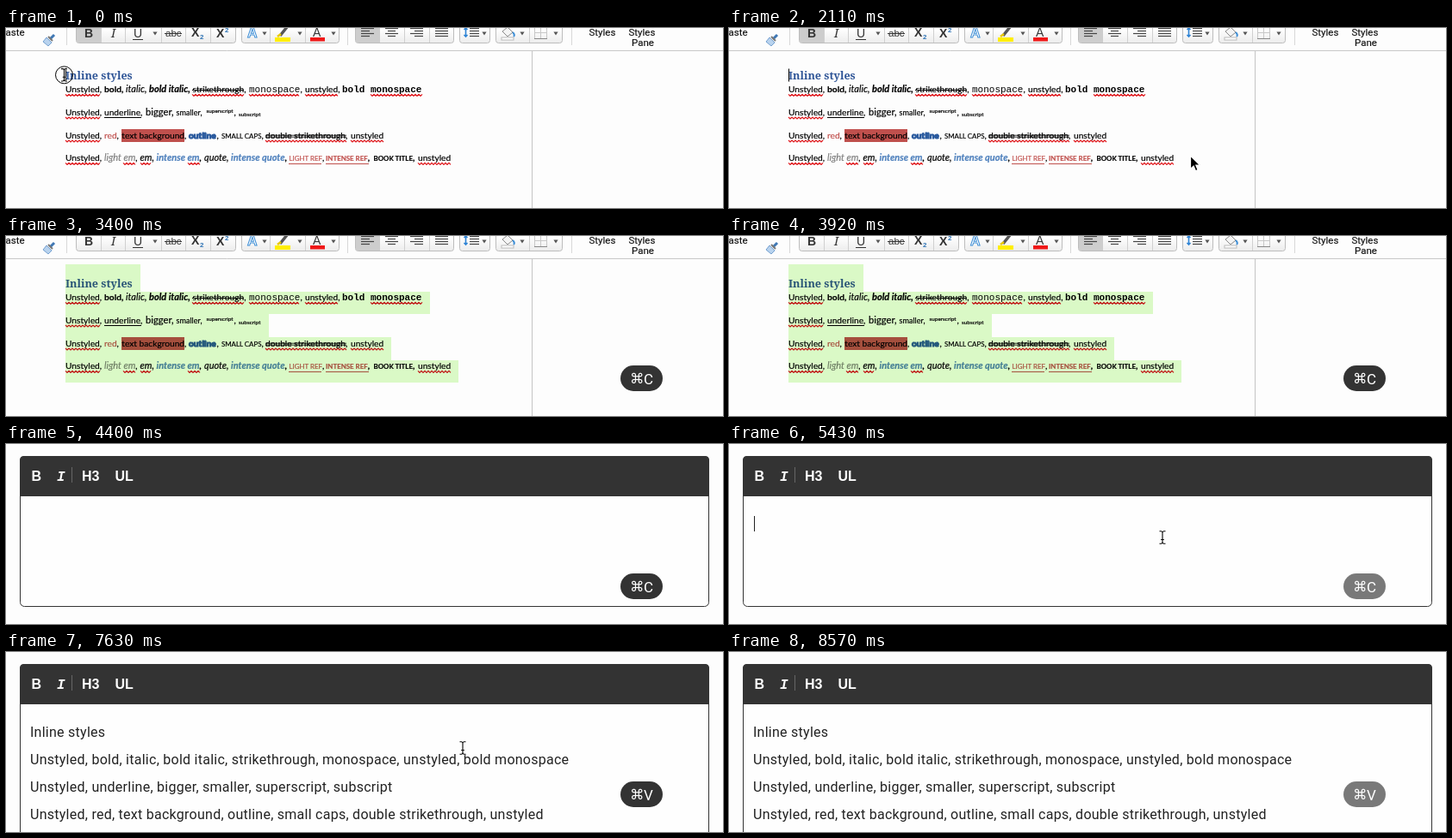
Recreate the animation shown at these times as an HTML page. Size 832 by 210 pixels, loop 8.67 s.

```html
<!DOCTYPE html>
<html lang="en">
<head>
<meta charset="utf-8">
<title>Copy and paste rich text</title>
<style>
  html, body { margin: 0; width: 100%; height: 100%; overflow: hidden; background: #fdfdfd; }
  svg { display: block; width: 832px; height: 210px; }
  text { white-space: pre; }
  .doc { font-family: Lato, Carlito, sans-serif; font-size: 10.2px; fill: currentColor; stroke: currentColor; stroke-width: .2; }
  .ui { font-family: Roboto, sans-serif; font-size: 11.5px; fill: #111; stroke: #111; stroke-width: .15; }
  .btn { font-family: "Liberation Sans", Arial, sans-serif; font-size: 14px; fill: #333; }
  .serif { font-family: "Noto Serif", serif; }
  .b { font-weight: 700; }
  .i { font-style: italic; }
  .doc.i { font-size: 11px; }
  .doc.caps { font-size: 7.9px; }
  .doc.mono { font-family: "Liberation Mono", monospace; font-size: 11px; stroke-width: 0; }
  .doc.outline { fill: #4f81bd; stroke: #2a5a9e; stroke-width: 1.2; }
  .body { font-family: Roboto, sans-serif; font-size: 16px; letter-spacing: .26px; fill: #222; }
  .tool { font-family: "Liberation Sans", Arial, sans-serif; font-size: 16px; font-weight: 700; fill: #fff; }
  .tool.i { font-family: "Liberation Mono", monospace; }
  .key { font-family: Roboto, sans-serif; font-size: 17px; fill: #fff; }
  .cmd { font-family: "DejaVu Sans", sans-serif; font-size: 16.5px; fill: #fff; }
  #selection { mix-blend-mode: multiply; }
</style>
</head>
<body>
<svg id="stage" viewBox="0 0 832 210" xmlns="http://www.w3.org/2000/svg"></svg>
<script>
const LOOP = 8670;
const RED = '#c0504d', BLUE = '#4f81bd', NAVY = '#2f5597';

const text = (x, y, str, cls = '', attrs = '') =>
  `<text x="${x}" y="${y}" class="${cls}" ${attrs}>${str}</text>`;
const rect = (x, y, w, h, fill, attrs = '') =>
  `<rect x="${x}" y="${y}" width="${w}" height="${h}" fill="${fill}" ${attrs}/>`;
const path = (d, stroke, width = 1, fill = 'none') =>
  `<path d="${d}" fill="${fill}" stroke="${stroke}" stroke-width="${width}"/>`;
const hline = (x1, x2, y, color = '#000', width = 1) => path(`M${x1},${y}H${x2}`, color, width);
const vline = (x, y1, y2, color) => path(`M${x},${y1}V${y2}`, color);

// Spell-checker underline
function squiggle(x1, x2, y) {
  let d = `M${x1},${y}`;
  for (let x = x1 + 2, k = 0; x <= x2; x += 2, k++) d += `L${x},${y + (k % 2 ? 0 : 2)}`;
  return path(d, '#e0161b', 1.2);
}

function ribbon() {
  const group = (x1, x2, dividers = []) =>
    rect(x1 + .5, -6.5, x2 - x1, 24, 'url(#gloss)', 'rx="3" stroke="#bdbdbd"') +
    dividers.map(x => vline(x + .5, 0, 17, '#d0d0d0')).join('');
  const pressed = (x, attrs) => rect(x, -6, 28, 23, '#cdcdcd', attrs);
  const drop = x => `<path d="M${x - 2.6},4.5h5.2l-2.6,4z" fill="#555"/>`;
  const bars = (x, widths, side) => widths.map((w, k) =>
    hline(x + (15 - w) * side, x + (15 - w) * side + w, .5 + k * 3, '#444', 1.2)).join('');

  return `<linearGradient id="gloss" x2="0" y2="1"><stop offset=".3" stop-color="#fff"/>
      <stop offset="1" stop-color="#ececec"/></linearGradient>` +
    hline(0, 832, 26.5, '#c8c8c8') +
    [70, 396, 656].map(x => vline(x + .5, 0, 20, '#d8d8d8')).join('') +
    text(-.5, 9, 'aste', 'ui') +
    path('M56,8L51,13', '#3f78b5', 3) + path('M49,10l5,5', '#777', 2) +
    path('M47,11l6,6l-4,4l-6,-5z', '#5b8fc7', .8, '#b9d3ee') +
    group(81, 266, [110, 138, 180, 208, 237]) + pressed(82, 'id="boldOn"') +
    text(91, 11, 'B', 'btn b') + text(122, 11, 'I', 'btn serif i') +
    text(148, 10.5, 'U', 'btn') + hline(147, 159, 13.5, '#333') + drop(173) +
    text(185, 10, 'abc', 'btn', 'style="font-size:11.5px"') + hline(184, 204, 6.5, '#333') +
    text(215, 10, 'X', 'btn b') + text(225, 13, '2', 'btn b', 'style="font-size:8px;fill:#2f74b5"') +
    text(244, 11, 'X', 'btn b') + text(254, 5, '2', 'btn b', 'style="font-size:8px;fill:#2f74b5"') +
    group(273, 386, [306, 347]) +
    text(280, 11, 'A', 'btn b', 'style="font-size:16px;fill:#fff;stroke:#3f8fd6;stroke-width:1"') + drop(300) +
    rect(312, 11, 18, 5, '#ffee00') + path('M318,9L326,-1', '#555', 3.5) + path('M315,10l4,-3', '#e8c800', 2.5) + drop(341) +
    text(356, 9.5, 'A', 'btn') + rect(353, 11, 17, 4.5, '#f01818') + drop(380) +
    group(405, 519, [433, 462, 491]) + pressed(406) +
    bars(412, [15, 10, 15, 10], 0) + bars(440, [15, 9, 15, 9], .5) +
    bars(469, [15, 10, 15, 10], 1) + bars(498, [15, 15, 15, 15], 0) +
    group(526, 561) + bars(538, [11, 11, 11, 11], 0) +
    path('M533.5,0V10M531.5,2l2,-2l2,2M531.5,8l2,2l2,-2', '#2f84d5', 1.6) + drop(555) +
    group(568, 645, [607]) +
    path('M576,4l6,-5l6,6l-6,5z', '#888', 1, '#f4f4f4') + path('M588,5q3,3 1,5', '#3f8fd6', 2) +
    rect(575, 11, 14, 3, '#fff', 'stroke="#bbb"') + drop(599) +
    path('M613.5,-2V12.5M627.5,12.5V-2M620.5,-2V12M613.5,5.5H627', '#c8c8c8') +
    hline(613, 628, 12.5, '#888') + drop(638) +
    text(676.5, 9, 'Styles', 'ui') + text(722.5, 9, 'Styles', 'ui') + text(726, 21, 'Pane', 'ui');
}

function documentText() {
  const [a, b, c, d] = [75.3, 102, 129, 155.3];
  const word = (x, y, str, cls = '', attrs = '') => text(x, y, str, 'doc ' + cls, attrs);
  const size = px => `style="font-size:${px}px"`;
  const ink = color => `style="color:${color}"`;
  const comma = `<tspan style="color:#000;font-size:10.2px">,</tspan>`;

  return text(69, 60, 'Inline styles', 'serif b', `font-size="12.65" fill="${NAVY}"`) +
    [a, b, c, d].map(y => word(69, y, 'Unstyled,') + squiggle(69, 109, y + 2)).join('') +

    word(114, a, 'bold,', 'b') + word(139, a, 'italic,', 'i') + word(166, a, 'bold italic,', 'b i') +
    word(216.5, a, 'strikethrough,') + hline(216, 276, 72.5) + squiggle(216, 276, a + 2) +
    word(282, a, 'monospace', 'mono') + word(341.5, a, ',') + squiggle(282, 341, a + 2) +
    word(347, a, 'unstyled,') + squiggle(347, 385, a + 2) +
    word(390, a, 'bold monospace', 'mono b') + squiggle(423, 483, a + 2) +

    word(114, b, 'underline,') + hline(114, 157, 104.5) +
    word(162, b, 'bigger,', '', size(11.2)) + word(197.5, b, 'smaller,', '', size(9.1)) +
    word(232.5, 98.8, 'superscript', '', size(6.4)) + word(264.5, b, ',') +
    word(270, 103.3, 'subscript', '', size(6.4)) +

    word(114, c, 'red' + comma, '', ink(RED)) +
    rect(134, 118, 73, 15, RED) + word(134.3, c, 'text background,') +
    word(212, c, 'outline', 'b outline') + word(244.5, c, ',') +
    word(250, c, 'SMALL CAPS' + comma, 'caps') +
    word(301, c, 'double strikethrough,') + hline(301, 395, 125.2, '#000', .8) +
    hline(301, 395, 127.2, '#000', .8) + squiggle(301, 395, c + 2) +
    word(400, c, 'unstyled') + squiggle(400, 438, c + 2) +

    word(114, d, 'light em' + comma, 'i', ink('#808080')) + squiggle(136, 151, d + 2) +
    word(155.5, d, 'em,', 'i') + squiggle(156, 169, d + 2) +
    word(174.5, d, 'intense em' + comma, 'b i', ink(BLUE)) + squiggle(211, 226, d + 2) +
    word(230, d, 'quote,', 'i') + word(261, d, 'intense quote' + comma, 'b i', ink(BLUE)) +
    word(328.5, d, 'LIGHT REF' + comma, 'caps', ink(RED)) + hline(328, 366, 158.5, RED) +
    word(371, d, 'INTENSE REF' + comma, 'caps b', ink(RED)) + hline(371, 421, 158.5, RED) +
    word(426.5, d, 'BOOK TITLE' + comma, 'caps b') +
    word(478, d, 'unstyled') + squiggle(478, 516, d + 2);
}

function selection() {
  const rows = [[33, 156], [65, 492], [91, 305], [118, 447], [145, 525], [171]];
  return rows.slice(0, -1).map(([y, right], k) =>
    rect(69, y, right - 69, rows[k + 1][0] - y, '#dcfbc8')).join('');
}

function editor() {
  const lines = [
    'Inline styles',
    'Unstyled, bold, italic, bold italic, strikethrough, monospace, unstyled, bold monospace',
    'Unstyled, underline, bigger, smaller, superscript, subscript',
    'Unstyled, red, text background, outline, small caps, double strikethrough, unstyled',
  ];
  return rect(0, 0, 832, 210, '#fdfdfd') +
    rect(16.5, 14.5, 799, 175, '#fefefe', 'id="frame" rx="5" stroke="#333"') +
    path('M16,61V19q0,-5 5,-5H811q5,0 5,5V61z', 'none', 0, '#333') +
    text(29.5, 43, 'B', 'tool') + text(59, 43, 'I', 'tool i') +
    vline(76.5, 27, 45, '#666') + text(88, 43, 'H3', 'tool') + text(126.5, 43, 'UL', 'tool') +
    `<g id="pasted">${lines.map((s, k) => text(28, 99 + 32 * k, s, 'body')).join('')}</g>` +
    rect(29, 84, 1, 18, '#222', 'id="caret"');
}

const overlays =
  `<g id="keys">${rect(713, 151, 49, 30, '#333', 'rx="15"')}
    ${text(724, 172.3, '⌘', 'cmd')}${text(740, 172.5, 'C', 'key', 'id="letter"')}</g>
  <g id="ibeam">${['#fff', '#000'].map((color, k) =>
    path('M-3.5,-7.2H-1.5Q0,-7 0,-5.5Q0,-7 1.5,-7.2H3.5M-3.5,7.2H-1.5Q0,7 0,5.5Q0,7 1.5,7.2H3.5M0,-6V6M-1.8,2.5H1.8',
      color, k ? 1.1 : 2.2)).join('')}</g>
  <g id="arrow">${path('M0,0V15.4L3.6,12.1L6,17.8L8.6,16.6L6.3,11.1H11.1Z', '#fff', 1.2, '#000')}</g>
  <circle id="ring" r="10" fill="none" stroke="#000" stroke-width="1"/>`;

document.getElementById('stage').innerHTML =
  `<g id="word">${rect(0, 0, 832, 210, '#fdfdfd')}${vline(610.5, 27, 210, '#c4c4c4')}${ribbon()}
    <g>${documentText()}</g><g id="selection">${selection()}</g>
    ${rect(69, 47.5, 1, 15, '#000', 'id="wordCaret"')}</g>
  <g id="editor">${editor()}</g>${overlays}`;

// Moves in equal hops from one point to the next, as [time, shape, x, y, ring]
function hops(shape, t0, t1, count, at) {
  return Array.from({ length: count }, (_, k) => {
    const u = k / (count - 1);
    return [t0 + (t1 - t0) * u, shape, ...at(u)];
  });
}
const mix = (a, b, u) => a + (b - a) * u;
const glide = (x0, y0, x1, y1) => u => [mix(x0, x1, u), mix(y0, y1, u)];

const pointer = [
  [0, 'ibeam', 67.5, 54.8, 1],
  [60, 'ibeam', 67.5, 54.8, .5],
  [380, 'ibeam', 67.5, 54.8],
  [680, 'ibeam', 73, 67],
  [740, 'ibeam', 67.5, 54.8],
  ...hops('ibeam', 1690, 1930, 4, u => [mix(67.5, 542.5, u), mix(54.8, 149.5, u), 1]),
  ...hops('arrow', 2110, 2510, 8, glide(535.5, 149, 199, 56)),
  ...hops('arrow', 2568, 2802, 5, glide(172, 47, 48, 4)),
  [2860, ''],
  ...hops('arrow', 3580, 3863, 6, glide(308, 70, 757, 104)),
  [3920, ''],
  ...hops('ibeam', 4690, 5020, 5, u => [mix(572, 504, 1 - (1 - u) ** 2), mix(94, 109, 1 - (1 - u) ** 2)]),
  [5200, 'ibeam', 503, 109],
  ...hops('ibeam', 5440, 5670, 5, glide(500, 108, 484.5, 103.2)),
  [7630, 'ibeam', 530, 112],
  [7690, 'ibeam', 593, 125],
  [7750, ''],
];
const keyFade = [[0, 0], [3400, 1], [5380, .65], [5440, .3], [5500, 0], [6610, 1], [8570, .65]];
const caretOn = [[0, 0], [5020, 1], [5530, 0], [6030, 1], [6380, 0]];
const SELECT = 2160, SWITCH = 4400, PASTE = 6500;

const current = (steps, t) => steps.findLast(step => step[0] <= t + .01);
const parts = {};
for (const id of ['word', 'editor', 'selection', 'boldOn', 'wordCaret', 'frame', 'pasted',
  'caret', 'keys', 'letter', 'ibeam', 'arrow', 'ring']) parts[id] = document.getElementById(id);
const show = (id, on) => parts[id].setAttribute('display', on ? 'inline' : 'none');

function draw(t) {
  const selected = t >= SELECT, pasted = t >= PASTE;
  show('word', t < SWITCH);
  show('editor', t >= SWITCH);
  show('selection', selected);
  show('boldOn', !selected);
  show('wordCaret', !selected);
  show('pasted', pasted);
  show('caret', current(caretOn, t)[1]);
  parts.frame.setAttribute('height', pasted ? 240 : 175);

  parts.keys.setAttribute('opacity', current(keyFade, t)[1]);
  parts.letter.textContent = pasted ? 'V' : 'C';

  const [, shape, x = 0, y = 0, ring = 0] = current(pointer, t);
  for (const id of ['ibeam', 'arrow', 'ring']) {
    show(id, id === shape || (id === 'ring' && ring));
    parts[id].setAttribute('transform', `translate(${x} ${y})`);
  }
  parts.ring.setAttribute('opacity', ring);
}

const start = performance.now();
function tick() {
  draw((performance.now() - start) % LOOP);
  requestAnimationFrame(tick);
}
tick();
</script>
</body>
</html>
```
